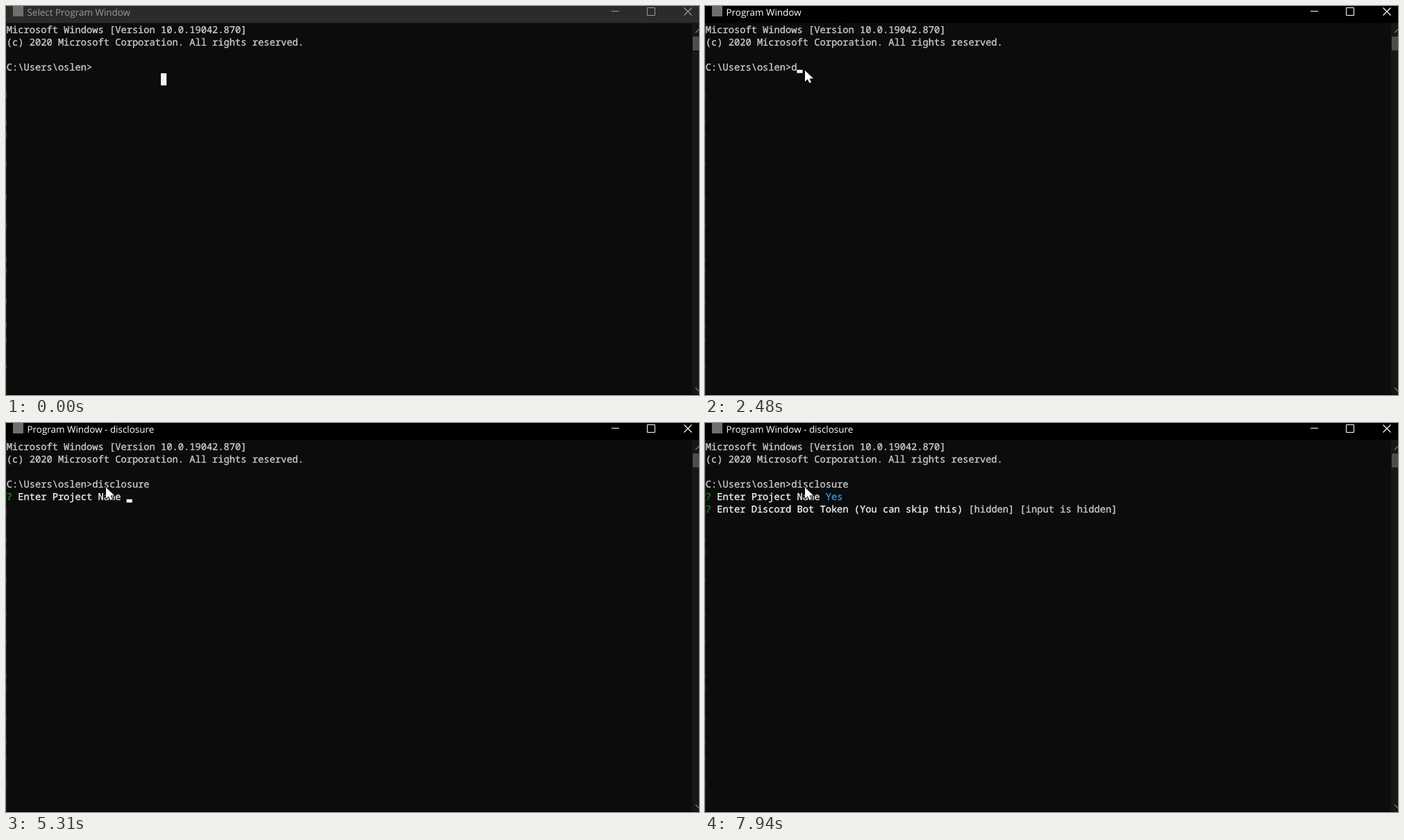
These frames come from a looping animation (998x561 px, 8000 ms). An HTML page:

```html
<!DOCTYPE html>
<html lang="en">
<head>
<meta charset="utf-8">
<title>Console</title>
<style>
  html, body { margin: 0; width: 100%; height: 100%; overflow: hidden; background: #0c0c0c; }
  svg { display: block; }
  text { white-space: pre; text-rendering: geometricPrecision; }
  #title { font: 13.45px "Open Sans", sans-serif; }
  #screen text { font: 13.73px "Noto Sans Mono", monospace; stroke-width: .35px; }
  #screen text, #screen .plain { fill: #ccc; stroke: #ccc; }
  #screen .bright { fill: #f2f2f2; stroke: #f2f2f2; }
  #screen .mark { fill: #13a10e; stroke: #13a10e; }
  #screen .done { fill: #108a0c; stroke: #108a0c; }
  #screen .answer { fill: #3a96dd; stroke: #3a96dd; }
  #bar { fill: #2b2b2b; }
  #title { fill: #999; }
  #buttons { stroke: #999; fill: none; }
  #specks { stroke: #5c5c5c; }
  .active #bar { fill: #000; }
  .active #title { fill: #fff; }
  .active #buttons { stroke: #fff; }
  .active #specks { stroke: #444; }
</style>
</head>
<body>
<svg id="stage" width="998" height="561" viewBox="0 0 998 561">
  <rect width="998" height="561" fill="#0c0c0c"/>
  <path d="M.5 24V561" stroke="#262626"/>
  <path id="specks" d="M.5 125v7m0 33v7m0 11v6m0 35v7m0 42v6m0 34v6m0 43v7m0 9v7m0 38v6m0 28v7m0 15v6m0 33v5"/>
  <path d="M0 560.5H998" stroke="#000"/>

  <rect id="bar" width="998" height="24.5"/>
  <rect x="10" y="0" width="15" height="15" fill="#6e6e6e"/>
  <text id="title" x="30.5" y="13.6"></text>
  <g id="buttons">
    <path d="M872 7.5H883M923.5 2.5h11v11h-11z"/>
    <path d="M976.5 2.5L987.5 13.5M987.5 2.5L976.5 13.5" stroke-width="1.2"/>
  </g>

  <rect x="988" y="24.5" width="10" height="536" fill="#171717"/>
  <rect x="989" y="44" width="9" height="20" fill="#4d4d4d"/>
  <path d="M993 38.5L998 33.5M993 550.5L998 555.5" stroke="#777" stroke-width="1.3"/>

  <g id="screen">
    <text x=".8" y="39">Microsoft Windows [Version 10.0.19042.870]</text>
    <text x=".8" y="57">(c) 2020 Microsoft Corporation. All rights reserved.</text>
    <text x=".8" y="93">C:\Users\oslen&gt;<tspan id="command"></tspan></text>
    <text x=".8" y="111" id="project"><tspan class="mark" id="projectMark">?</tspan><tspan class="bright"> Enter Project Name </tspan><tspan id="reply"></tspan></text>
    <text x=".8" y="129" id="token"><tspan class="done">?</tspan><tspan class="bright"> Enter Discord Bot Token (You can skip this) </tspan>[hidden] [input is hidden]</text>
  </g>
  <rect id="block" x="223" y="97" width="8.2" height="17.5" fill="#f2f2f2"/>
  <rect id="caret" width="8.2" height="4.7" fill="#f2f2f2"/>
  <circle id="click" cx="143.5" cy="91.5" r="13.3" fill="#ff0" fill-opacity=".47"/>
  <path id="pointer" d="M0 0V16L3.8 12.4L6.3 18L8.9 16.9L6.5 11.4H12Z" fill="#fff" stroke="#0c0c0c" stroke-width="1.6" paint-order="stroke"/>
</svg>
<script>
const LOOP = 8000, CELL = 8.235, ROW = 18, LEFT = 0.6;
const NAME = "Program Window";
const $ = id => document.getElementById(id);
const caret = (col, row = 3) => ({ col, row, on: true });
const type = (command) => ({ command, ...caret(15 + command.length) });
const answer = (reply) => ({ reply, ...caret(21 + reply.length, 4) });
const point = (x, y) => ({ pointer: [x, y] });
const on = { on: true }, off = { on: false };

const start = {
  title: "Select " + NAME, active: false, block: true, click: false, pointer: null,
  command: "", reply: "", project: false, token: false, answered: false,
  col: 15, row: 3, on: false
};

// Each step changes part of the state and holds until the next one.
const steps = [
  [360, point(699, 321)],
  [430, point(686, 310)],
  [510, point(676, 303)],
  [830, point(440, 212)],
  [910, point(255, 137)],
  [1210, point(205, 114)],
  [1300, point(158, 97)],
  [1380, point(144, 93)],
  [1530, { active: true, click: true }],
  [1780, { click: false }],
  [2080, on],
  [2480, { title: NAME, block: false, ...type("d") }],
  [2630, type("di")],
  [2710, type("dis")],
  [3180, off],
  [3330, type("disc")],
  [3420, type("discl")],
  [3650, type("disclo")],
  [3720, off],
  [3800, type("disclos")],
  [3960, type("disclosu")],
  [4110, type("disclosur")],
  [4190, type("disclosure")],
  [4270, caret(0, 4)],
  [4350, { title: NAME + " - disclosure" }],
  [4670, { project: true, ...caret(21, 4) }],
  [4740, off],
  [5310, on],
  [5850, off],
  [6090, answer("Y")],
  [6320, answer("Ye")],
  [6400, answer("Yes")],
  [6550, { answered: true }],
  [6700, { token: true, ...caret(73, 5) }],
  [6860, off],
  [7390, on],
  [7940, off]
];

const show = (id, visible) => $(id).setAttribute("visibility", visible ? "visible" : "hidden");

function draw(time) {
  const state = { ...start };
  for (const [t, change] of steps) if (t <= time) Object.assign(state, change);

  $("stage").classList.toggle("active", state.active);
  for (const id of ["title", "command", "reply"]) $(id).textContent = state[id];
  for (const id of ["block", "click", "project", "token", "pointer"]) show(id, state[id]);
  $("projectMark").setAttribute("class", state.answered ? "done" : "mark");
  $("reply").setAttribute("class", state.answered ? "answer" : "plain");

  show("caret", state.on);
  $("caret").setAttribute("x", LEFT + state.col * CELL);
  $("caret").setAttribute("y", 38 + state.row * ROW);
  if (state.pointer) $("pointer").setAttribute("transform", `translate(${state.pointer})`);
}

const begin = performance.now();
function tick() {
  draw((performance.now() - begin) % LOOP);
  requestAnimationFrame(tick);
}
tick();
</script>
</body>
</html>
```
